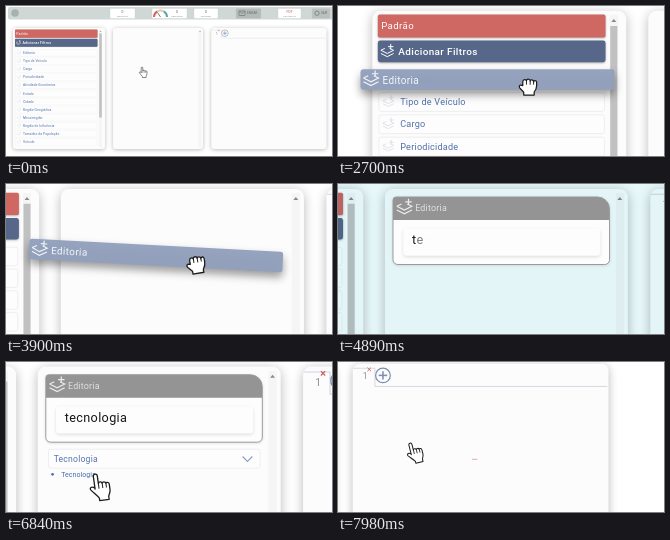
An HTML page with a canvas for the animation above (8 s loop, 326 px wide and 150 px high).

```html
<!DOCTYPE html>
<html lang="pt-BR">
<head>
<meta charset="utf-8">
<title>Filtros</title>
<style>
html, body { margin: 0; width: 100%; height: 100%; overflow: hidden; background: #fff; }
canvas { display: block; width: 326px; height: 150px; }
</style>
</head>
<body>
<canvas id="stage"></canvas>
<script>
const W = 326, H = 150, LOOP = 8000;
const canvas = document.getElementById('stage');
const dpr = window.devicePixelRatio || 1;
canvas.width = W * dpr;
canvas.height = H * dpr;
const c = canvas.getContext('2d');

const items = ['Editoria', 'Tipo de Veículo', 'Cargo', 'Periodicidade', 'Atividade Econômica',
  'Estado', 'Cidade', 'Região Geográfica', 'Mesorregião', 'Região de Influência',
  'Tamanho da População', 'Veículo'];

const lerp = (a, b, k) => a + (b - a) * k;
const mix = (a, b, k) => a.map((v, i) => lerp(v, b[i], k));
const span = (t, a, b) => Math.min(1, Math.max(0, (t - a) / (b - a)));
const inOut = k => k < .5 ? 4 * k ** 3 : 1 - 4 * (1 - k) ** 3;
const cubeIn = k => k ** 3;
const glide = k => .9 * (k ** 3 - 2 * k * k + k) + 3 * k * k - 2 * k ** 3;
const soft = k => k * k * (3 - 2 * k);

// time, values, easing towards this step
function track(steps, t) {
  let [, prev] = steps[0], start = steps[0][0];
  for (const [time, val, ease] of steps) {
    if (t < time) return mix(prev, val, (ease || soft)(span(t, start, time)));
    prev = val;
    start = time;
  }
  return prev;
}

// scale, x, y
const listCam = [2.76, 15, -56], cardCam = [2.7, -242, -54.5];
const camera = [
  [576, [1, 0, 0]], [1650, listCam, inOut],
  [3000, listCam], [4120, cardCam, inOut],
  [6480, cardCam], [6840, [2.7, -257, -54.8], cubeIn],
  [7960, [2.22, -441, -47], glide]
];

// tip x, tip y, size, angle, opacity
const pointer = [
  [500, [136, 61, .39, 0, 1]], [1200, [248, 86, .75, -38, 1]],
  [1660, [248, 86, .75, -38, 1]], [1930, [187.5, 72, .95, 0, 1]],
  [3030, [187.5, 72, .95, 0, 1]], [3750, [187.5, 72, 1, -10, 1]],
  [4130, [187.5, 72, 1, -10, 1]], [4300, [187.5, 72, 1, 0, 0]],
  [5459, [170, 25, 1, -8, 0]], [5560, [169, 26, 1, -8, 1]],
  [6240, [89, 112, 1, -8, 1]], [6270, [89, 112, 1, -8, 1]],
  [6300, [89, 112, .92, -8, 1]], [6330, [89, 112, 1, -8, 1]],
  [6860, [89, 112, 1, -8, 1]], [7800, [72, 81, .78, -14, 1]]
];

const hand = new Path2D('M5.5 16V3.2a2 2 0 0 1 4 0V11c.3-2 3.6-2 3.8.2c.6-1.7 3.5-1.5 3.7.6c.7-1.3 3.2-.9 3.2 1.3v5.5c0 3-1.8 4.4-2.2 6.4V28H8.5v-2.5C6.5 22.5 4 20 1.2 16.4C-.4 14 2.6 12.2 5.5 15Z');
const handLines = new Path2D('M9.5 11v5M13.3 11.4v4.6M17 12v4');
const fist = new Path2D('M5 11c-3.6-1.5-4.4 .5-3 2.6L6 18v3h11v-3c1.6-2 2.6-4 2.6-7V7.5c0-2.2-3-2.4-3.2-.4C16.4 4.4 13 4.3 12.8 6.2C12.6 3.6 9 3.6 8.9 6C8.2 4 5 4.4 5 7Z');
const fistLines = new Path2D('M8.9 6v4M12.8 6.2v4M16.4 7v3');
const layers = new Path2D('M-4-.8L0 1.2L4-.8L1.5-2M-1.5-2L-4-.8M-4 1.2L0 3.2L4 1.2M2.2-4.8v3.4M.5-3.1h3.4');

function box(x, y, w, h, r, fill, stroke, lw = .3) {
  c.beginPath();
  c.roundRect(x, y, w, h, r);
  if (fill) { c.fillStyle = fill; c.fill(); }
  if (stroke) { c.strokeStyle = stroke; c.lineWidth = lw; c.stroke(); }
}

function shaded(blur, dy, color, draw) {
  c.save();
  c.shadowColor = color;
  c.shadowBlur = blur * dpr;
  c.shadowOffsetY = dy * dpr;
  draw();
  c.restore();
}

function text(str, x, y, size, color, { ls = .08, weight = 400, align = 'left' } = {}) {
  c.font = `${weight} ${size}px Roboto, Arial, sans-serif`;
  c.letterSpacing = ls + 'px';
  c.textAlign = align;
  c.textBaseline = 'alphabetic';
  c.fillStyle = color;
  c.fillText(str, x, y + size * .355);
}

function line(color, lw, ...pts) {
  c.beginPath();
  pts.forEach(([x, y], i) => i ? c.lineTo(x, y) : c.moveTo(x, y));
  c.strokeStyle = color;
  c.lineWidth = lw;
  c.stroke();
}

function icon(x, y, size, color) {
  c.save();
  c.translate(x, y);
  c.scale(size / 8, size / 8);
  c.strokeStyle = color;
  c.lineWidth = .62;
  c.stroke(layers);
  c.restore();
}

function scrollbar(x, thumb) {
  box(x, 23.5, 3, 118, 0, '#f5f5f5');
  c.beginPath();
  c.moveTo(x + .6, 26.1);
  c.lineTo(x + 1.5, 25);
  c.lineTo(x + 2.4, 26.1);
  c.fillStyle = '#888';
  c.fill();
  if (thumb) box(x + .2, 27.5, 2.6, thumb, 0, '#c1c1c1');
}

function badge(x, w, fill, label, color = '#777') {
  box(x, 2.5, w, 10, 1, fill, '#c5cbca');
  if (!label) return;
  text('0', x + w / 2, 6, 4, color, { align: 'center' });
  text(label, x + w / 2, 10.3, 2.4, color, { align: 'center' });
}

function topBar() {
  box(2, 1, 328, 12.5, 2, '#cfd8d5');
  c.beginPath();
  c.arc(9, 7, 3.8, 0, 7);
  c.fillStyle = '#a7b2b0';
  c.fill();
  badge(104, 25, '#fff', 'NOTÍCIAS');
  badge(146, 35, '#fff');
  text('0', 171, 6, 4, '#777', { align: 'center' });
  text('VEÍCULOS', 171, 10.3, 2.4, '#777', { align: 'center' });
  ['#d7605c', '#e9c9a5', '#55a8a4'].forEach((col, i) => {
    c.beginPath();
    c.arc(154.5, 11, 6.5, Math.PI * (1 + i / 3), Math.PI * (1 + (i + 1) / 3));
    c.strokeStyle = col;
    c.lineWidth = 2;
    c.stroke();
  });
  line('#444', .7, [154.5, 11], [151.5, 6.5]);
  badge(188, 24, '#fff', 'CIDADES');
  badge(230, 25, '#b4bab9');
  box(233, 5, 6, 4.5, .5, null, '#707675', .7);
  line('#707675', .6, [233, 5], [236, 7.5], [239, 5]);
  text('ENVIAR', 241, 7.3, 2.8, '#666');
  badge(272, 23, '#fff');
  text('PDF', 283.5, 5.8, 3.2, '#cc5c58', { align: 'center' });
  text('EXPORTAR', 283.5, 9.8, 2.4, '#888', { align: 'center' });
  badge(306, 18, '#b9c0be');
  c.beginPath();
  c.arc(311, 7.2, 2.2, 0, 7);
  c.strokeStyle = '#707675';
  c.lineWidth = .7;
  c.stroke();
  text('SAIR', 315, 7.3, 2.8, '#666');
}

function panel(x, w, s) {
  shaded(4.4 * s, .8 * s, 'rgba(0,0,0,.28)', () => box(x, 22, w, 121, 3, '#fcfcfc'));
}

function listPanel(s) {
  panel(7, 92, s);
  shaded(.8 * s, .3 * s, 'rgba(0,0,0,.3)', () => {
    box(9, 23.4, 82.5, 8.3, .7, '#cf6763');
    box(9, 32.8, 82.5, 7.9, .9, '#566789');
  });
  text('Padrão', 10.2, 27.5, 3.5, '#fff', { ls: .14 });
  icon(12.4, 36.8, 4.6, '#fff');
  text('Adicionar Filtros', 16.4, 36.9, 3.6, '#fff', { ls: .14, weight: 500 });
  items.forEach((name, i) => {
    const y = 47 + 8.07 * i;
    box(9.4, y - 3.4, 81.7, 6.8, .8, '#fdfdfd', '#ececee');
    icon(12.8, y, 4, '#dcdfe6');
    text(name, 17.1, y, 3.3, '#4f70aa');
  });
  scrollbar(93, 84);
}

function resultPanel(s, t) {
  panel(205.3, 115.2, s);
  line('#d2d6df', .4, [205.5, 24], [215.3, 24], [215.3, 32.2], [320, 32.2]);
  text('1', 210.9, 27.7, 3.8, '#8f8f8f', { align: 'center' });
  line('#c8575a', .4, [211.9, 23.7], [213.5, 25.3]);
  line('#c8575a', .4, [213.5, 23.7], [211.9, 25.3]);
  c.beginPath();
  c.arc(218.9, 27.2, 3.3, 0, 7);
  c.strokeStyle = '#7f8db1';
  c.lineWidth = .55;
  c.stroke();
  line('#7f8db1', .7, [217, 27.2], [220.8, 27.2]);
  line('#7f8db1', .7, [218.9, 25.3], [218.9, 29.1]);
  c.globalAlpha = span(t, 7880, 7980);
  line('#eba8a8', .45, [259, 65], [261.4, 65]);
  c.globalAlpha = 1;
}

function card(s, t) {
  const grow = soft(span(t, 4390, 4600));
  const h = lerp(8.6, 25, grow);
  const corners = [1.2, 4.5, 1.8, 1.8];
  shaded(1.2 * s, .3 * s, 'rgba(0,0,0,.16)', () => box(110, 25, 80.2, h, corners, '#fdfdfd'));
  c.save();
  c.beginPath();
  c.roundRect(110, 25, 80.2, h, corners);
  c.clip();
  box(110, 25, 80.2, 8.5, 0, '#949494');
  c.globalAlpha = grow;
  shaded(1.3 * s, .4 * s, 'rgba(0,0,0,.13)', () => box(113.8, 36.8, 73, 10, 1.3, '#fdfdfd'));
  c.globalAlpha = 1;
  c.restore();
  box(110, 25, 80.2, h, corners, null, '#999', .36);
  icon(114.2, 29, 5.6, '#ececec');
  text('Editoria', 118.2, 29.1, 3.3, '#e0e0e0');
  typed('tecnologia', t);
}

function typed(word, t) {
  let x = 117;
  [...word].forEach((ch, i) => {
    c.globalAlpha = span(t, 4780 + 55 * i, 4880 + 55 * i);
    text(ch, x, 40.9, 4.7, '#161616', { ls: .13 });
    x += c.measureText(ch).width;
  });
  c.globalAlpha = 1;
}

function results(t) {
  c.globalAlpha = span(t, 5330, 5430);
  box(111, 52.6, 78.4, 7, .8, '#fdfdfd', '#ececf0');
  text('Tecnologia', 112.9, 56.2, 3.2, '#5674ae');
  line('#8c9ec6', .42, [182.9, 55.3], [184.7, 57.1], [186.5, 55.3]);
  c.beginPath();
  c.arc(112.5, 61.9, .5, 0, 7);
  c.fillStyle = '#4a6db0';
  c.fill();
  text('Tecnologia', 115.7, 61.9, 2.6, '#4a6db0', { ls: .02 });
  c.globalAlpha = 1;
}

function dragBar(t, px, py) {
  const lift = soft(span(t, 2220, 2420));
  const drop = soft(span(t, 4130, 4390));
  const tilt = 3 * soft(span(t, 3030, 3750)) * (1 - drop);
  const w = lerp(lerp(228, 254, lift), 217, drop);
  const h = lerp(lerp(19, 20.5, lift), 23, drop);
  const x = lerp(px - 38, 163.5, drop), y = lerp(py + 1.6, 24.5, drop);
  const rgb = mix([146, 161, 189], [148, 148, 148], drop).map(Math.round);
  c.save();
  c.globalAlpha = lift;
  c.translate(px + 2.5, py + 9);
  c.rotate(tilt * Math.PI / 180);
  c.translate(x - px - 2.5, y - py - 9);
  shaded(9 * lift, 5 * lift, 'rgba(0,0,0,.4)', () =>
    box(-w / 2, -h / 2, w, h, [3, lerp(3, 12, drop), 3, 3], `rgba(${rgb},.96)`));
  icon(-w / 2 + 10.5, 0, 15, '#f2f4f8');
  text('Editoria', -w / 2 + 22, .4, lerp(10, 8.9, drop), '#f4f6fa', { ls: .35 });
  c.restore();
}

function drawPointer([x, y, size, angle, alpha], grab) {
  if (!alpha) return;
  c.save();
  c.globalAlpha = alpha;
  c.translate(x, y);
  // the fist turns about its middle, the hand about its fingertip
  if (grab) c.translate(2.5, 9);
  c.rotate(angle * Math.PI / 180);
  c.scale(size, size);
  c.translate(grab ? -10.5 : -7.5, grab ? -12.5 : -1);
  c.lineJoin = 'round';
  c.fillStyle = '#fff';
  c.strokeStyle = '#1c1c1c';
  c.lineWidth = 1.3;
  c.fill(grab ? fist : hand);
  c.stroke(grab ? fist : hand);
  c.lineWidth = 1;
  c.stroke(grab ? fistLines : handLines);
  c.restore();
}

function tintStage(t) {
  c.save();
  c.setTransform(dpr, 0, 0, dpr, 0, 0);
  c.globalCompositeOperation = 'multiply';
  c.globalAlpha = span(t, 4650, 4800) * (1 - span(t, 5250, 5430));
  c.fillStyle = '#e7f8fa';
  c.fillRect(0, 0, W, H);
  c.restore();
}

function draw(t) {
  const [s, tx, ty] = track(camera, t);
  const ptr = track(pointer, t);
  c.setTransform(dpr, 0, 0, dpr, 0, 0);
  c.fillStyle = '#fff';
  c.fillRect(0, 0, W, H);

  c.save();
  c.translate(tx, ty);
  c.scale(s, s);
  topBar();
  listPanel(s);
  panel(107, 90, s);
  scrollbar(192.5);
  resultPanel(s, t);
  tintStage(t);
  if (t >= 4390) card(s, t);
  if (t >= 5330) results(t);
  c.restore();

  if (t >= 2220 && t < 4390) dragBar(t, ptr[0], ptr[1]);
  drawPointer(ptr, t >= 2220 && t < 4400);
}

const begin = performance.now();
function tick() {
  draw((performance.now() - begin) % LOOP);
  requestAnimationFrame(tick);
}
tick();
</script>
</body>
</html>
```
